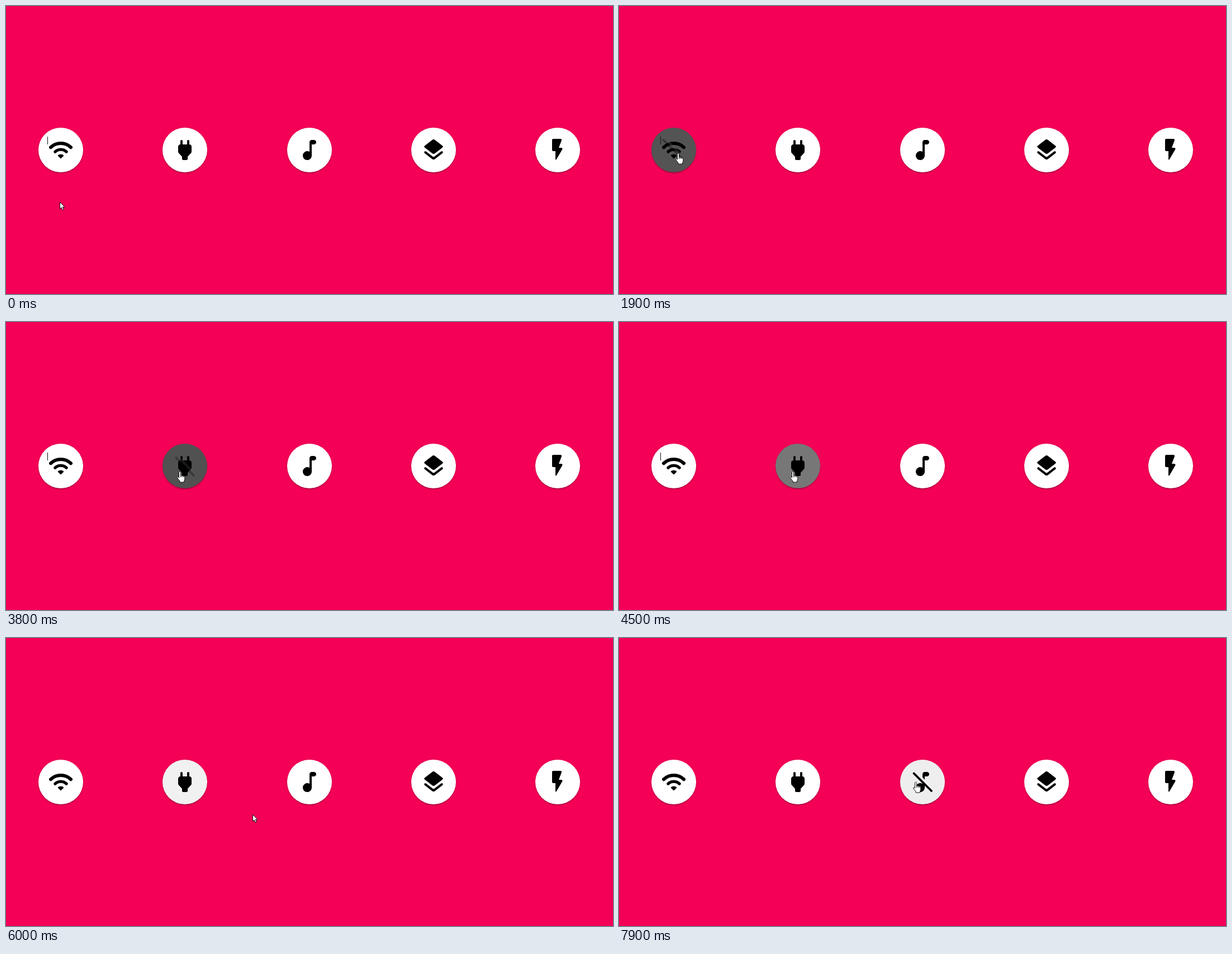
Animation, 1086 px wide and 516 px high, one loop 8000 ms. Source, as an HTML page:

```html
<!DOCTYPE html>
<html lang="en">
<head>
<meta charset="utf-8">
<title>Icon toggles</title>
<style>
  html, body { margin: 0; width: 100%; height: 100%; overflow: hidden; background: #f50057; }
  .button {
    position: absolute; top: 218px; width: 80px; height: 80px; border-radius: 50%;
    background: #fff;
    box-shadow: 0 3px 1px -2px rgba(0,0,0,.2), 0 2px 2px rgba(0,0,0,.14), 0 1px 5px rgba(0,0,0,.12);
  }
  .button svg { position: absolute; left: 16px; top: 16px; width: 48px; height: 48px; overflow: visible; }
  .line { fill: none; stroke: #000; stroke-linecap: round; stroke-linejoin: round; }
  #caret { position: absolute; left: 74px; top: 234px; width: 1px; height: 14px; background: #111; }
  #cursor { position: absolute; left: 0; top: 0; width: 20px; height: 24px; overflow: visible; }
  #cursor path { fill: #fff; stroke: #111; stroke-width: 1; stroke-linejoin: round; }
</style>
</head>
<body>
<script>
const LOOP = 8000, STEP = 100, FADE = 850;

const icons = [
  { art: `<path class="line" stroke-width="3" d="M3 9.6A13.1 13.1 0 0 1 21 9.6"/>
          <path class="line" stroke-width="2.7" d="M7 13.6A7.1 7.1 0 0 1 17 13.6"/>
          <path class="line" style="fill:#000" stroke-width="1.2" d="M10 17Q12 15.7 14 17L12 19Z"/>`,
    slash: [2.7, 3, 19.4, 19.7], clicks: [809, 1270, 1740, 2171] },
  { art: `<path d="M16 7V4c0-.55-.45-1-1-1s-1 .45-1 1v3h-4V4c0-.55-.45-1-1-1s-1 .45-1 1v3
          C6.9 7 6 7.9 6 9v4.5c0 .5.2 1 .6 1.4L9.5 18v2c0 .55.45 1 1 1h3c.55 0 1-.45 1-1v-2
          l2.9-3.1c.4-.4.6-.9.6-1.4V9c0-1.1-.9-2-2-2z"/>`,
    slash: [4.2, 4.6, 19.9, 20.4], clicks: [3645, 4260, 4859, 5350] },
  { art: `<path d="M12 5v8.55c-.94-.54-2.1-.75-3.33-.32-1.34.48-2.37 1.67-2.61 3.07
          -.46 2.74 1.86 5.08 4.59 4.65 1.96-.31 3.35-2.11 3.35-4.1V7h2c1.1 0 2-.9 2-2s-.9-2-2-2h-2c-1.1 0-2 .9-2 2z"/>`,
    slash: [4.3, 4.3, 20, 20], clicks: [7190] },
  { art: `<path d="M12.6 18.06c-.36.28-.87.28-1.23 0l-6.15-4.78c-.36-.28-.86-.28-1.22 0-.51.4-.51 1.17 0 1.57
          l6.76 5.26c.72.56 1.73.56 2.46 0l6.76-5.26c.51-.4.51-1.17 0-1.57-.36-.28-.86-.28-1.22 0z
          M13.23 15.04l6.76-5.26c.51-.4.51-1.18 0-1.58l-6.76-5.26c-.72-.56-1.73-.56-2.46 0L4.01 8.21
          c-.51.4-.51 1.18 0 1.58l6.76 5.26c.72.56 1.74.56 2.46-.01z"/>` },
  { art: `<path d="M7 3v9c0 .55.45 1 1 1h2v7.15c0 .51.67.69.93.25l5.19-8.9c.39-.67-.09-1.5-.86-1.5H13
          l2.49-6.65c.25-.65-.23-1.35-.93-1.35H8c-.55 0-1 .45-1 1z"/>` }
];

// Time and hotspot of the pointer
const track = [
  [0, 95.5, 350.5], [200, 95.5, 350.5], [600, 106, 264], [2900, 106, 264],
  [3100, 148, 325], [3300, 230, 386], [3550, 310.5, 268], [5500, 310.5, 268],
  [5800, 385, 300], [6000, 441, 316], [6300, 482, 309], [6450, 500, 285],
  [6900, 530.5, 257.5], [LOOP, 530.5, 257.5]
];

const clamp = v => Math.max(0, Math.min(1, v));
const mix = (a, b, k) => a + (b - a) * k;

icons.forEach((icon, i) => {
  icon.x = 97.8 + 222.35 * i;
  const el = icon.el = document.createElement('div');
  el.className = 'button';
  el.style.left = icon.x - 40 + 'px';
  let body = icon.art;
  if (icon.slash) {
    const [x1, y1, x2, y2] = icon.slash;
    body = `<mask id="cut${i}" maskUnits="userSpaceOnUse" x="-2" y="-2" width="28" height="28">
        <rect x="-2" y="-2" width="28" height="28" fill="#fff"/>
        <path class="line fade" stroke-width="2.4" d="M${x1 + 1.2} ${y1 - 1.2}L${x2 + 1.2} ${y2 - 1.2}"/>
      </mask><g mask="url(#cut${i})">${icon.art}</g>
      <path class="line fade" stroke-width="1.9" d="M${x1} ${y1}L${x2} ${y2}"/>`;
  }
  el.innerHTML = `<svg viewBox="0 0 24 24">${body}</svg>`;
  icon.fades = el.querySelectorAll('.fade');
  document.body.append(el);
});

document.body.insertAdjacentHTML('beforeend', `<div id="caret"></div>
  <svg id="cursor">
    <path id="arrow" d="M.5 .5V12.5L3.2 10 5 14.5 7.2 13.5 5.3 9.2H9Z"/>
    <path id="hand" d="M-1.5 1.5C-1.5-.5 1.5-.5 1.5 1.5V6.5L7 7.7Q8.8 8.2 8.8 10V13Q8.8 15.5 7.5 17V19H0V17
      L-4 12Q-5.2 9.8-3.5 9.3L-1.5 11ZM1.5 6.5V10M4 7.2V10M6.4 7.7V10"/>
  </svg>`);
const [caret, cursor, arrow, hand] = ['caret', 'cursor', 'arrow', 'hand'].map(id => document.getElementById(id));

function pointerAt(t) {
  const i = track.findIndex(p => p[0] > t);
  const [a, b] = [track[i - 1], track[i]];
  const k = (t - a[0]) / (b[0] - a[0]);
  return [mix(a[1], b[1], k), mix(a[2], b[2], k)];
}

function draw(t) {
  const [px, py] = pointerAt(t);
  let overButton = false;
  for (const { el, x, clicks = [], fades } of icons) {
    const hover = Math.hypot(px - x, py - 258) < 40;
    overButton ||= hover;
    const past = clicks.filter(c => c <= t);
    const age = past.length ? t - past[past.length - 1] : Infinity;
    const light = 1 - (1 - clamp(age / FADE)) ** 2;
    const grey = Math.round((hover ? 245 : 255) * light);
    el.style.background = `rgb(${grey},${grey},${grey})`;
    const change = clamp((age - 125) / 100);
    const off = past.length % 2 ? change : past.length ? 1 - change : 0;
    fades.forEach(f => f.style.opacity = off);
  }
  cursor.style.transform = `translate(${Math.round(px)}px,${Math.round(py)}px)`;
  arrow.style.display = overButton ? 'none' : '';
  hand.style.display = overButton ? '' : 'none';
  caret.style.visibility = (t + 50) % 900 < 450 ? 'visible' : 'hidden';
}

const start = performance.now();
function tick() {
  const t = (performance.now() - start) % LOOP;
  draw(Math.floor(t / STEP) * STEP);
  requestAnimationFrame(tick);
}
tick();
</script>
</body>
</html>
```
